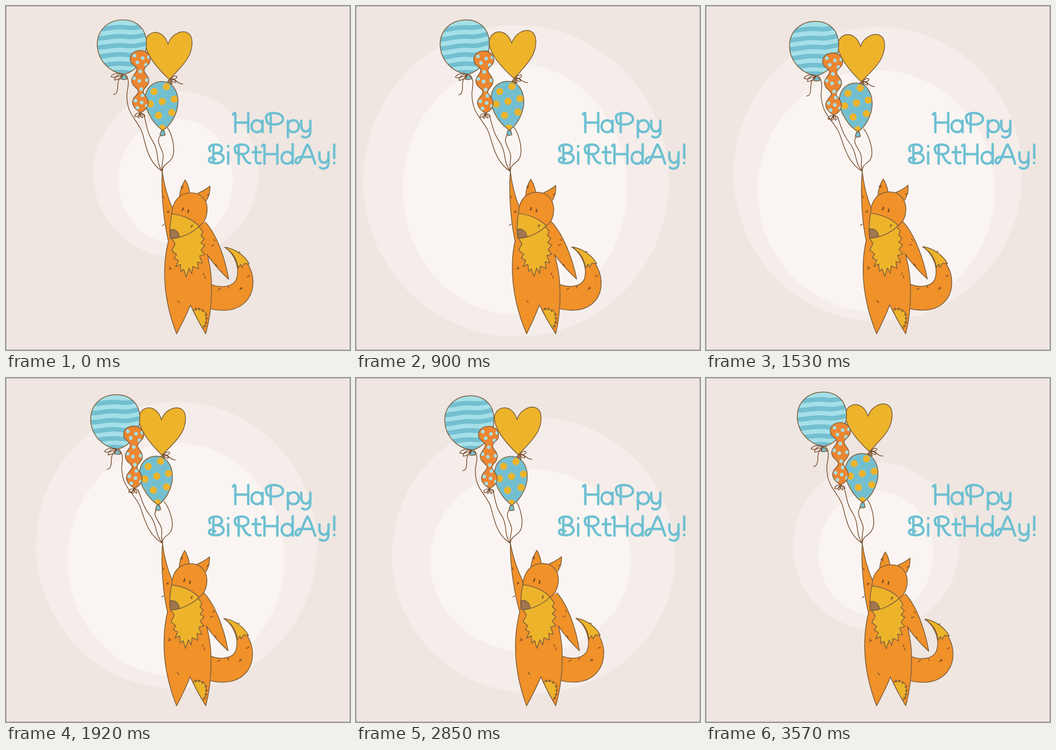
Recreate the animation shown at these times as an HTML page. Size 720 px wide and 720 px high, loop 3600 ms.

```html
<!DOCTYPE html>
<html lang="en">
<head>
<meta charset="utf-8">
<title>Happy Birthday!</title>
<style>
  html, body { margin: 0; width: 100%; height: 100%; overflow: hidden; background: #efe6e1; }
  svg { display: block; width: 100vw; height: 100vh; }
  path { stroke-linecap: round; stroke-linejoin: round; }
  .ink { stroke: #80603e; stroke-width: 1.7; }
  .line { fill: none; }
  .thin { fill: none; stroke: #75492a; stroke-width: 1.5; }
  .orange { fill: #f09129; }
  .yellow { fill: #edb42b; }
  .blue { fill: #73bfd0; }
  .pale { fill: #a5dfe7; }
  .brown { fill: #a07650; }
  .letters { fill: none; stroke: #6ec0d2; stroke-width: 5; }
</style>
</head>
<body>
<svg viewBox="0 0 720 720">
  <defs>
    <path id="roundShape" d="M246 143C215 138 191 112 191 80C191 50 214 29 245 29C274 29 294 48 294 78C294 108 275 137 246 143Z"/>
    <path id="wavyShape" d="M282 223C272 218 265 210 265 201C265 190 277 186 277 179C277 171 263 169 263 155C264 144 275 140 274 132C273 125 260 123 260 111C260 100 270 93 281 93C293 93 302 101 302 112C302 124 289 126 289 134C289 142 299 145 299 157C298 169 287 172 287 179C287 186 298 190 298 203C297 212 291 219 282 223Z"/>
    <path id="dropShape" d="M328 260C312 250 291 222 291 195C292 170 308 158 327 158C347 158 360 176 360 200C360 226 343 252 328 260Z"/>
    <clipPath id="roundClip"><use href="#roundShape"/></clipPath>
    <clipPath id="wavyClip"><use href="#wavyShape"/></clipPath>
    <clipPath id="dropClip"><use href="#dropShape"/></clipPath>
  </defs>

  <ellipse id="outer" fill="#f5edea"/>
  <ellipse id="inner" fill="#faf5f2"/>

  <g class="letters" role="img" aria-label="Happy Birthday!">
    <path d="M475 227Q480 221 480 227V264M507 224V264M480 244H507"/>
    <path d="M537 240V264M537 252C537 235 514 235 514 252C514 268 537 268 537 252"/>
    <path d="M554 225V264M546 240C540 229 549 224 560 224C586 224 586 248 562 248C550 248 545 245 546 240"/>
    <path d="M590 240V275M590 252C590 235 613 235 613 252C613 268 590 268 590 252"/>
    <path d="M618 240V250C618 267 637 267 637 250V240V262C637 276 626 277 620 273"/>
    <path d="M434 291V328M427 304C422 294 429 290 440 290C456 290 456 308 440 308H434M440 308C461 308 460 329 440 329C428 329 424 326 425 321C427 316 433 317 438 321"/>
    <path d="M465 306V330M465 293v1"/>
    <path d="M487 291V330M480 304C476 293 484 290 494 290C512 290 512 310 494 310C484 310 480 307 480 304M494 310C499 318 503 329 511 329"/>
    <path d="M523 295V322C523 330 528 330 533 329M516 306H533"/>
    <path d="M536 293Q541 287 541 293V330M568 290V330M541 310H568"/>
    <path d="M600 289V330M600 318C600 301 577 301 577 318C577 334 600 334 600 318"/>
    <path d="M647 330C642 315 637 297 631 290C625 297 618 326 611 329C604 331 604 318 614 316H642"/>
    <path d="M656 306V316C656 332 675 332 675 316V306V328C675 342 663 342 657 338"/>
    <path d="M687 290V318M687 328v1"/>
  </g>

  <g id="strings" class="thin"></g>

  <g id="heart">
    <path class="yellow ink" d="M342 154C325 138 296 108 292 82C288 52 328 42 339 80C346 58 368 50 380 56C394 64 390 88 384 102C376 120 356 138 342 154Z"/>
    <path class="brown ink" d="M344 151L337 160Q342 164 348 163Z"/>
    <path class="thin" d="M345 153C350 146 357 145 358 149C356 153 350 155 345 153C352 154 357 157 355 160C350 160 347 157 345 153C355 150 358 164 370 163"/>
  </g>
  <g id="round">
    <use href="#roundShape" class="pale"/>
    <g id="stripes" clip-path="url(#roundClip)" fill="none" stroke="#73bfd0" stroke-width="9.5"></g>
    <use href="#roundShape" class="ink line"/>
    <path class="blue ink" d="M246 143L240 153Q248 155 255 152Z"/>
    <path class="thin" d="M246 143C235 138 222 142 220 148C224 151 236 148 246 143C236 140 228 147 227 155C234 155 242 150 246 143M244 144C236 152 234 158 234 166C234 176 232 185 225 185"/>
  </g>
  <g id="drop">
    <use href="#dropShape" class="blue"/>
    <g id="bigDots" clip-path="url(#dropClip)" class="yellow"></g>
    <use href="#dropShape" class="ink line"/>
    <path class="blue ink" d="M325 261L322 270Q328 273 333 270L331 261Z"/>
  </g>
  <g id="wavy">
    <use href="#wavyShape" fill="#ec8631"/>
    <g id="smallDots" clip-path="url(#wavyClip)" class="pale"></g>
    <use href="#wavyShape" class="ink line"/>
    <path class="thin" d="M281 224C273 223 268 228 270 232C276 232 280 228 281 224C276 228 275 234 278 234C281 232 281 228 281 224C286 228 288 233 285 234C282 232 281 228 281 224C287 224 292 229 290 232"/>
  </g>

  <path id="arm" class="orange ink"/>
  <path id="armTicks" class="thin"/>
  <g id="body">
    <path class="orange ink" d="M430 583C450 591 475 588 482 572C490 550 480 520 458 505C480 507 515 535 517 575C518 615 490 637 455 637Q440 637 429 634"/>
    <path class="yellow ink" d="M458 505C478 507 500 522 509 540L499 539L494 547L491 541L486 548L484 540C481 525 472 514 458 505Z"/>
    <path class="orange ink" d="M340 492C334 515 332 540 332 560C332 610 345 655 357 686Q374 655 386 626Q400 656 418 686C428 650 431 615 430 580C430 560 426 540 422 522Q442 550 466 572C460 535 443 480 417 452"/>
    <path class="yellow ink" d="M392 637C400 631 415 635 419 645C421 660 418 668 412 675Q400 656 392 637Z"/>
    <path class="thin" d="M397 632l1 5M405 632l-1 5M413 636l-3 4M421 645l-5 2M422 654l-5 0M421 663l-5-1M418 671l-5-2"/>
    <path class="yellow ink" d="M347 487L354 498L347 512L357 520L352 528L361 533L355 546L365 541L366 556L372 551L377 567L383 549L389 560L391 545L403 550L401 536L411 538L405 523L416 520L408 511L416 501L408 496L415 487L408 481L412 473L403 461Z"/>
    <path class="thin" d="M342 546l4 4M341 551l4-1M359 617l4 4M413 559l1 4M416 566l1 4M421 520l3 5M430 502l5-2M435 489l3 3M439 541l3 3M444 594l5-3M465 587l2 4M489 594l5-5M490 590l4 2M505 567l5-3M487 515l3 0"/>
    <g id="head">
      <path class="orange ink" d="M363 400C364 386 370 372 375 364Q383 376 385 394M401 392Q416 386 427 377C427 390 425 398 419 408"/>
      <path class="thin" d="M366 379l4 3M371 377l-4 4M421 396l5-2"/>
      <path class="orange ink" d="M347 436C348 410 362 391 388 391C410 391 421 408 421 425C421 445 412 456 404 461"/>
      <path class="yellow ink" d="M347 435C343 455 342 475 344 487C365 487 390 475 404 461C392 447 370 438 347 435Z"/>
      <path class="brown ink" d="M344 468C353 466 362 472 363 484Q353 487 344 487Z"/>
      <path class="thin" d="M387 460l3 1M390 458l-2 6"/>
      <path id="eyes" class="thin" style="stroke-width:2.8" d="M371 423l-2 5M382 427l-1 5"/>
    </g>
  </g>
  <rect x=".5" y=".5" width="719" height="719" fill="none" stroke="#aaa3a0"/>
</svg>
<script>
const LOOP = 3600;
const $ = id => document.getElementById(id);

const dots = (points, r) => points.map(([x, y]) => `<circle cx="${x}" cy="${y}" r="${r}"/>`).join('');
$('bigDots').innerHTML = dots([[310, 179], [336, 169], [302, 205], [327, 200], [352, 195],
  [319, 229], [347, 223], [296, 232], [327, 256]], 7.5);
$('smallDots').innerHTML = dots([[269, 104], [286, 109], [275, 118], [293, 123], [299, 107], [281, 137],
  [268, 151], [279, 157], [295, 155], [283, 174], [286, 187], [271, 198], [284, 202], [295, 209], [275, 213]], 3.8);
$('stripes').innerHTML = [45, 64, 83, 102, 121, 139].map(y =>
  `<path d="M186 ${y + 4}C215 ${y + 3} 230 ${y - 3} 250 ${y}S285 ${y - 3} 300 ${y - 5}"/>`).join('');

// Smooth periodic curve through values at the given times.
function curve(values, t, times = [0, 420, 900, 1530, 2250, 2850]) {
  const n = times.length;
  const at = i => times[(i + n) % n] + LOOP * Math.floor(i / n);
  const value = i => values[(i + n) % n];
  const slope = i => (value(i + 1) - value(i - 1)) / (at(i + 1) - at(i - 1));
  let i = n - 1;
  while (times[i] > t) i--;
  const span = at(i + 1) - at(i), u = (t - at(i)) / span, v = 1 - u;
  return v * v * (1 + 2 * u) * value(i) + u * u * (3 - 2 * u) * value(i + 1)
    + span * u * v * (v * slope(i) - u * slope(i + 1));
}

// Move a path's points by a blend of two end offsets, according to height.
function bend(d, y0, from, y1, to) {
  return d.replace(/([\d.]+),([\d.]+)/g, (_, x, y) => {
    const u = (y - y0) / (y1 - y0);
    return [0, 1].map(k => +[x, y][k] + from[k] + u * (to[k] - from[k])).join();
  });
}

// Offsets of each knot, tilt about it, and the string hanging from it.
const balloons = [
  { id: 'round', knot: [247, 146], x: [0, -6, -12, -15, -11, -3], y: [0, -4, 0, 3, 8, 8],
    tilt: [0, -1.5, -2.5, -1, 0, -2],
    string: 'M249,142C262,155 253,175 253,185C252,225 272,235 284,262C292,283 294,325 327,346' },
  { id: 'heart', knot: [342, 154], x: [0, -7, -11, -17, -12, -2], y: [0, -4, -2, 5, 9, 7],
    tilt: [0, 0, -1.5, 1, 1, 0],
    string: 'M338,255C345,264 351,285 351,300C352,332 328,325 327,346' },
  { id: 'wavy', knot: [282, 223], x: [0, -5, -10, -14, -10, -2], y: [0, -2, 1, 5, 9, 8],
    tilt: [0, -1, -1.8, -1, -.5, -.8],
    string: 'M288,226C294,245 295,265 306,281C322,305 312,325 327,346' },
  { id: 'drop', knot: [328, 262], x: [0, -3, -7, -10, -8, -2], y: [0, -2, -.5, 3, 7, 6],
    tilt: [0, -1, -1.6, -2, -1.6, .5],
    string: 'M324,271C310,283 330,300 329,315C328,328 325,335 327,346' },
];
$('strings').innerHTML = balloons.map(b => `<path id="${b.id}String"/>`).join('');

const glowTimes = [0, 420, 900, 1230, 1530, 2250, 2850];
const glows = {
  outer: { left: [183, 97, 15, 36, 58, 65, 75], right: [528, 585, 655, 686, 662, 648, 668],
    top: [177, 100, 40, 38, 44, 57, 82], bottom: [525, 575, 692, 685, 660, 648, 660] },
  inner: { left: [235, 143, 98, 100, 108, 145, 155], right: [475, 543, 567, 600, 604, 567, 575],
    top: [235, 168, 120, 124, 134, 142, 190], bottom: [497, 543, 645, 650, 640, 610, 575] },
};

function draw(now) {
  const t = Math.floor(now % LOOP / 30) * 30;

  for (const id in glows) {
    const [l, r, top, b] = Object.values(glows[id]).map(side => curve(side, t, glowTimes));
    const box = { cx: (l + r) / 2, cy: (top + b) / 2, rx: (r - l) / 2, ry: (b - top) / 2 };
    for (const key in box) $(id).setAttribute(key, box[key]);
  }

  const hand = [curve([0, -2, -4, 0, 0, -4], t), 0];
  for (const { id, knot, x, y, tilt, string } of balloons) {
    const offset = [curve(x, t), curve(y, t)];
    $(id).setAttribute('transform', `translate(${offset}) rotate(${curve(tilt, t)},${knot})`);
    $(id + 'String').setAttribute('d', bend(string, knot[1], offset, 346, hand));
  }

  // The body leans and stretches from the feet.
  const feet = 686, reach = 194;
  const lean = curve([0, -4, -7, -4.7, .3, 2.8], t);
  const stretch = curve([0, .002, .004, .006, .01, .01], t);
  $('body').setAttribute('transform',
    `matrix(1,0,${-lean / reach},${1 + stretch},${lean * feet / reach},${-stretch * feet})`);
  const shoulder = [lean, -stretch * reach];
  const arm = d => bend(d, 346, hand, feet - reach, shoulder);
  $('arm').setAttribute('d', arm('M340,492C332,460 324,400 327,346C331,375 340,405 349,425L352,488'));
  $('armTicks').setAttribute('d', arm('M329,398L331,402M337,430L341,432M341,429L338,433M327,460L331,457'));
  $('head').setAttribute('transform', `translate(${curve([0, .4, 2.2, 3.6, .6, -1.2], t)})`);
  $('eyes').setAttribute('transform', `translate(${curve([0, 1.5, 3.3, 3.2, 4, .3], t)})`);
}

const start = performance.now();
function frame() {
  draw(performance.now() - start);
  requestAnimationFrame(frame);
}
frame();
</script>
</body>
</html>
```
